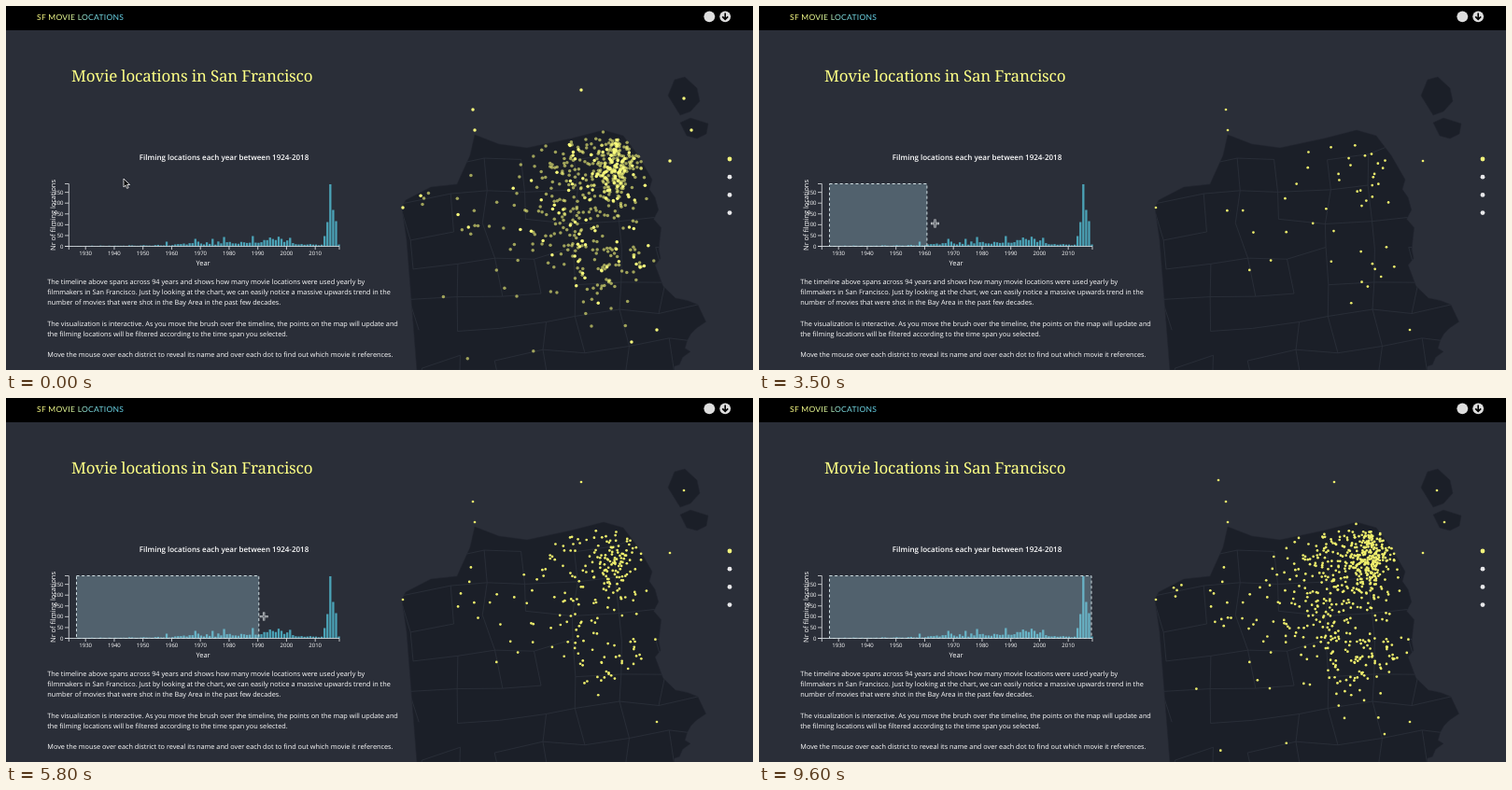
Recreate the animation shown at these times as an HTML page with a canvas. Size 800 px wide and 390 px high, loop 9700 ms.

```html
<!DOCTYPE html>
<html lang="en">
<head>
<meta charset="utf-8">
<title>Movie locations</title>
<style>
  html, body { margin: 0; width: 100%; height: 100%; overflow: hidden; background: #2a2e38; }
  svg, canvas { position: absolute; left: 0; top: 0; width: 800px; height: 390px; display: block; }
  text { font-family: "Open Sans", sans-serif; font-size: 7.3px; fill: #fff; text-rendering: geometricPrecision; }
  .brand { font: 8.5px Lato, sans-serif; letter-spacing: .28px; fill: url(#fade); }
  .title { font: 17px "Noto Serif", serif; letter-spacing: -.2px; fill: #fdff85; }
  .head { font-size: 8px; font-weight: 600; text-anchor: middle; }
  .label { font-size: 7.4px; text-anchor: middle; }
  .tick { font-size: 6px; text-anchor: middle; }
  .axis { fill: none; stroke: #e4e6e9; stroke-width: .8; }
  .land { fill: #1b1f28; stroke: #222630; stroke-width: .6; }
  .border { fill: none; stroke: #2d323c; stroke-width: .8; }
  .bar { fill: #4ba3b7; }
  .brush { fill: rgba(173, 216, 230, .3); stroke: #cfdde1; stroke-dasharray: 3 2.6; }
</style>
</head>
<body>
<svg viewBox="0 0 800 390">
  <defs>
    <linearGradient id="fade" gradientUnits="userSpaceOnUse" x1="33" x2="125" y1="0" y2="0">
      <stop offset=".1" stop-color="#fdff85"/>
      <stop offset=".42" stop-color="#d9f59a"/>
      <stop offset=".6" stop-color="#7fdde0"/>
      <stop offset="1" stop-color="#62cfe6"/>
    </linearGradient>
    <clipPath id="coast"><path id="coastline"/></clipPath>
  </defs>
  <rect width="800" height="26" fill="#000"/>
  <text class="brand" x="33" y="15">SF MOVIE LOCATIONS</text>
  <circle cx="753.3" cy="11.3" r="5.9" fill="#dedede"/>
  <circle cx="770.2" cy="11.3" r="5.9" fill="#dedede"/>
  <path d="M770.2 7.6v6.4M767.2 11.4l3 3 3-3" fill="none" stroke="#000" stroke-width="1.6"/>
  <text class="title" x="70" y="81">Movie locations in San Francisco</text>
  <g id="map"></g>
  <g id="chart">
    <text class="head" x="233.5" y="164.8">Filming locations each year between 1924-2018</text>
    <text class="label" x="211" y="278.4">Year</text>
  </g>
  <rect id="brush" class="brush" x="75.5" y="190.5" height="67"/>
  <text class="label" transform="translate(52.6 224) rotate(-90)">Nr of filming locations</text>
  <g id="copy">
    <text x="44.3" y="298.2">The timeline above spans across 94 years and shows how many movie locations were used yearly by</text>
    <text x="44.3" y="309.3">filmmakers in San Francisco. Just by looking at the chart, we can easily notice a massive upwards trend in the</text>
    <text x="44.3" y="320.4">number of movies that were shot in the Bay Area in the past few decades.</text>
    <text x="44.3" y="342.6">The visualization is interactive. As you move the brush over the timeline, the points on the map will update and</text>
    <text x="44.3" y="353.7">the filming locations will be filtered according to the time span you selected.</text>
    <text x="44.3" y="375.8">Move the mouse over each district to reveal its name and over each dot to find out which movie it references.</text>
  </g>
  <g id="nav"></g>
  <g id="cursor">
    <path id="arrow" d="M0 0v9l2.1-1.9 1.5 3.3 1.6-.7-1.5-3.2h2.9z" fill="#000" stroke="#fff" stroke-width=".8"/>
    <g id="cross" fill="none">
      <path d="M-4.5 0h9M0-4.5v9" stroke="#c9cdd0" stroke-width="2.4"/>
      <path d="M-3.8 0h7.6M0-3.8v7.6" stroke="#4a4f57" stroke-width=".8"/>
    </g>
  </g>
</svg>
<canvas id="dots"></canvas>
<script>
const LOOP = 9700, STEP = 100, BASE = 257.5, LEFT = 75.5, RIGHT = 356;
const $ = id => document.getElementById(id);

function add(parent, tag, attrs, text) {
  const el = document.createElementNS('http://www.w3.org/2000/svg', tag);
  for (const k in attrs) el.setAttribute(k, attrs[k]);
  if (text !== undefined) el.textContent = text;
  return parent.appendChild(el);
}

// Linear interpolation through rows of [position, ...values]
function sample(keys, t) {
  const i = keys.findIndex(k => k[0] > t);
  if (i < 0) return keys[keys.length - 1].slice(1);
  if (!i) return keys[0].slice(1);
  const a = keys[i - 1], b = keys[i], f = (t - a[0]) / (b[0] - a[0]);
  return a.slice(1).map((v, j) => v + (b[j + 1] - v) * f);
}

// Seeded random numbers
let seed = 1924;
function rnd() {
  seed = seed + 0x6D2B79F5 | 0;
  let r = Math.imul(seed ^ seed >>> 15, 1 | seed);
  r = r + Math.imul(r ^ r >>> 7, 61 | r) ^ r;
  return ((r ^ r >>> 14) >>> 0) / 4294967296;
}
const gauss = () => (rnd() + rnd() + rnd() - 1.5) * 2;
const jitter = size => (rnd() - .5) * size;
function pick(weights) {
  let left = rnd() * weights.reduce((a, b) => a + b);
  return weights.findIndex(w => (left -= w) < 0);
}

// Ragged shoreline between two points
function shore(x0, y0, x1, y1, n, size) {
  let d = '';
  for (let i = 1; i <= n; i++)
    d += `L${x0 + (x1 - x0) * i / n + jitter(size)} ${y0 + (y1 - y0) * i / n + jitter(size / 3)}`;
  return d;
}

// Map
const LAND = 'M440 390L429 250 424 216 428 208 455 194 483 191 497 160 502 138 528 148 558 152 605 142 640 133 661 139 677 160 692 186' +
  shore(692, 186, 702, 300, 11, 11) + shore(706, 308, 738, 320, 3, 6) + shore(748, 335, 718, 388, 9, 18) + 'V390Z';
const ISLANDS = ['M709 96L716 79 727 76 740 88 743 102 733 113 722 117Z', 'M722 125L733 120 752 126 750 137 740 142 729 139Z'];
$('coastline').setAttribute('d', LAND);
for (const d of [LAND, ...ISLANDS]) add($('map'), 'path', { class: 'land', d });

// District borders: a loose, slightly tilted grid
const grid = [];
for (let r = 0; r < 8; r++) {
  grid.push([]);
  for (let c = 0; c < 8; c++)
    grid[r].push([422 + c * 45 + r * 3 + jitter(16), 175 + r * 35 - c * 4 + jitter(14)]);
}
let borders = '';
grid.forEach((row, r) => row.forEach((p, c) => {
  if (c && rnd() < .85) borders += `M${row[c - 1]}L${p}`;
  if (r && rnd() < .75) borders += `M${grid[r - 1][c]}L${p}`;
}));
add($('map'), 'path', { class: 'border', d: borders, 'clip-path': 'url(#coast)' });

// Chart: trend in bar height, rough until the final surge
const TREND = [[1924, .4], [1945, .8], [1960, 1.5], [1970, 4], [1985, 4], [1995, 8.5], [2001, 7], [2005, 2], [2012, 2],
  [2013, 11], [2014, 26], [2015, 66.5], [2016, 39], [2017, 27], [2018, 2]];
const PEAKS = { 1958: 5, 1968: 8, 1974: 8, 1978: 10, 1988: 11 };
const yearX = year => 85.2 + (year - 1930) * 3.075;
const chart = $('chart'), bars = [];
for (let year = 1924; year <= 2018; year++) {
  const rough = year < 2013 ? .45 + rnd() * .9 : 1;
  const h = PEAKS[year] || sample(TREND, year)[0] * rough;
  bars.push(h);
  add(chart, 'rect', { class: 'bar', x: yearX(year) - .4, y: BASE - h, width: 2.3, height: h });
}
let ticks = 'M63 190.5H67.3V257.5H63M67.3 261V257.5H357V261';
for (let n = 0; n <= 250; n += 50) {
  const y = BASE - n * .2315;
  ticks += `M63 ${y}H67`;
  add(chart, 'text', { class: 'tick', x: 61.5, y: y + 2.1, style: 'text-anchor: end' }, n);
}
for (let year = 1930; year <= 2010; year += 10) {
  const x = yearX(year);
  ticks += `M${x} 257.5V261`;
  add(chart, 'text', { class: 'tick', x, y: 266.5 }, year);
}
add(chart, 'path', { class: 'axis', d: ticks });

for (let i = 0; i < 4; i++)
  add($('nav'), 'circle', { cx: 775, cy: 164 + i * 19.2, r: 2.4, fill: i ? '#e8e8ea' : '#f3f57c' });

// Dots: each has a place and the timeline position where it joins the selection
const ratio = window.devicePixelRatio || 1;
const canvas = $('dots'), ctx = canvas.getContext('2d');
canvas.width = 800 * ratio;
canvas.height = 390 * ratio;

// Offshore and far-off spots: x, y, year
const dots = [[500, 111, 1930], [502, 133, 1935], [711, 166, 1940], [425, 216, 1945], [697, 347, 1955], [616, 90, 1970],
  [726, 99, 1990], [734, 133, 2010], [492, 88, 2012]]
  .map(([x, y, year]) => ({ x, y, at: yearX(year), late: year === 2012, bright: true }));

// x, y, spread x, spread y, weight
const CLUSTERS = [[652, 172, 9, 14, 26], [641, 166, 24, 17, 22], [640, 205, 24, 16, 10], [592, 178, 20, 17, 9],
  [607, 238, 24, 17, 13], [645, 272, 30, 18, 14], [545, 225, 40, 22, 5], [480, 225, 35, 20, 3], [600, 315, 75, 30, 4]];
const share = CLUSTERS.map(c => c[4]);
const land = new Path2D(LAND);
for (let n = 0; n < 640;) {
  const [cx, cy, sx, sy] = CLUSTERS[pick(share)];
  const x = cx + gauss() * sx, y = cy + gauss() * sy;
  if (!ctx.isPointInPath(land, x, y)) continue;
  const at = Math.min(RIGHT - .5, yearX(1924 + pick(bars)) + rnd() * 2);
  dots.push({ x, y, at, late: rnd() < .12, bright: rnd() < .15 });
  n++;
}

function drawDots(edge) {
  ctx.setTransform(ratio, 0, 0, ratio, 0, 0);
  ctx.clearRect(0, 0, 800, 390);
  ctx.fillStyle = edge ? '#eeee6c' : '#f8fa7c';
  for (const d of dots) {
    if (edge ? d.at > edge : d.late) continue;
    ctx.globalAlpha = edge || d.bright ? 1 : .6;
    ctx.beginPath();
    ctx.arc(d.x, d.y, edge ? 1.35 : 1.75, 0, 7);
    ctx.fill();
  }
}

// Pointer: time, x, y; the brush edge trails it
const POINTER = [[300, 126, 185], [1100, LEFT, 192], [1400, LEFT, 192], [3500, 188.5, 233], [4900, 246, 235],
  [6900, 313, 233], [8000, 358.5, 234], [8500, 366, 236]];
const LAG = 160, BRUSH_START = 1500, POINTER_END = 8500;
const show = (id, on) => $(id).setAttribute('visibility', on ? 'visible' : 'hidden');

function draw(t) {
  const [x, y] = sample(POINTER, t);
  const inside = y >= 190 && x <= 357, seen = t < POINTER_END;
  $('cursor').setAttribute('transform', `translate(${x} ${y})`);
  show('arrow', seen && !inside);
  show('cross', seen && inside);

  const active = t > BRUSH_START;
  const edge = Math.min(RIGHT, sample(POINTER, t - LAG)[0]);
  if (active) $('brush').setAttribute('width', edge - LEFT);
  show('brush', active);
  drawDots(active ? edge : 0);
}

const start = performance.now();
let last = -1;
function tick() {
  const t = Math.floor((performance.now() - start) % LOOP / STEP) * STEP;
  if (t !== last) draw(last = t);
  requestAnimationFrame(tick);
}
tick();
</script>
</body>
</html>
```
